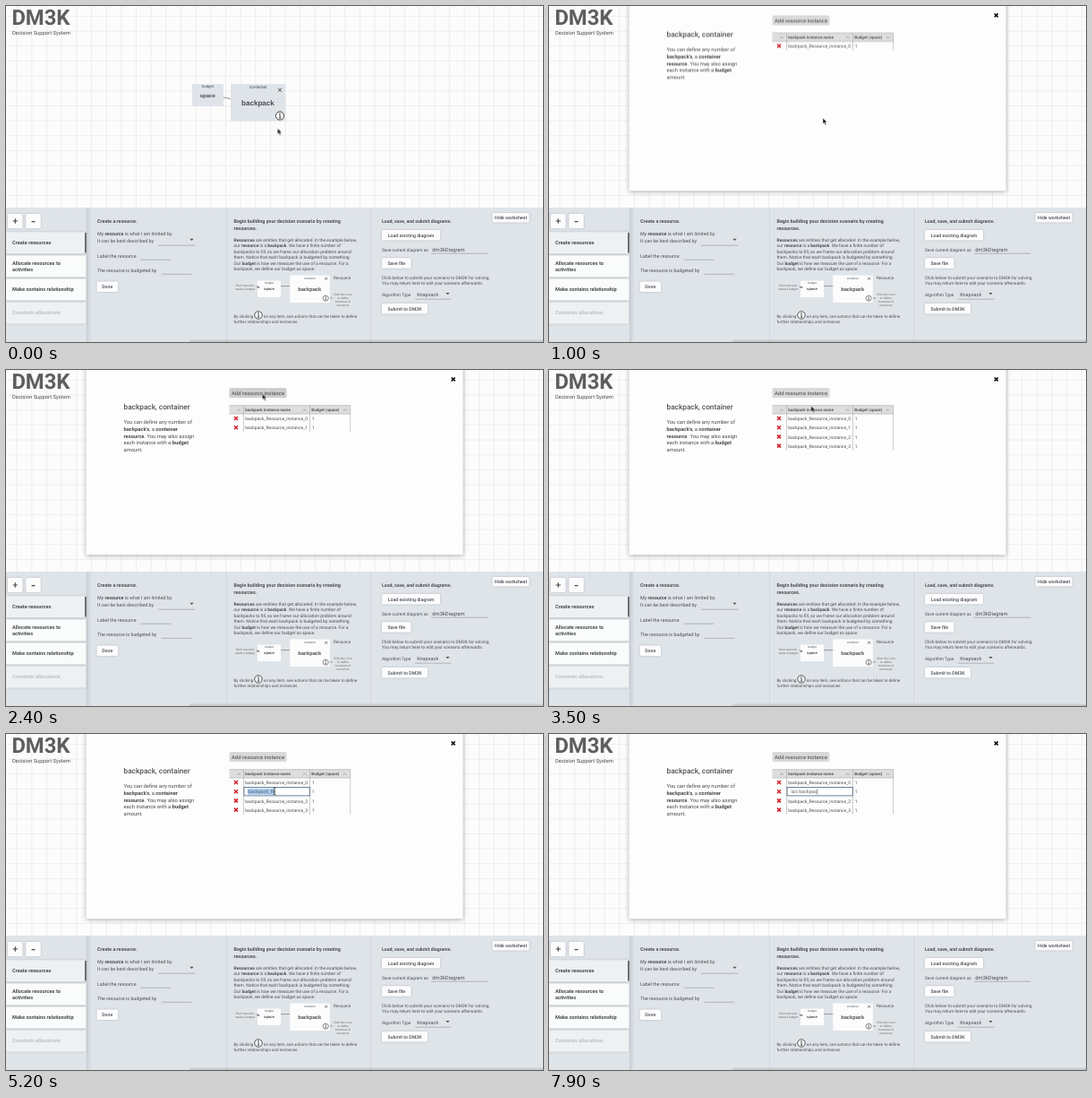
An HTML page that plays this animation: 600 px wide and 375 px high, repeating every 8 s.

```html
<!DOCTYPE html>
<html lang="en">
<head>
<meta charset="utf-8">
<title>Decision worksheet</title>
<style>
  html, body { margin: 0; width: 100%; height: 100%; overflow: hidden; background: #fcfcfc; }
  svg {
    display: block; width: 600px; height: 375px; fill: #484c50;
    font-family: Roboto, sans-serif; text-rendering: geometricPrecision;
  }
  .arial { font-family: "Liberation Sans", Arial, sans-serif; }
  .b { font-weight: 700; }
  .m { text-anchor: middle; }
  .white { fill: #fcfcfd; }
  .panel { fill: #dfe4e9; }
  .line { stroke: #8d9399; stroke-width: .6; fill: none; }
  .raised { fill: #fcfcfd; filter: drop-shadow(0 .5px .8px rgba(0, 0, 0, .2)); }

  .s32 { font-size: 3.2px; }
  .s46 { font-size: 4.6px; }
  .s48 { font-size: 4.82px; }
  .s49 { font-size: 4.92px; }
  .s50 { font-size: 4.95px; }
  .s52 { font-size: 5.2px; }
  .s53 { font-size: 5.3px; }
  .s54 { font-size: 5.42px; }
  .s56 { font-size: 5.65px; }
  .s58 { font-size: 5.8px; }

  /* Everything moves in hard 100 ms steps: 1.25% of the loop each. */
  .anim { animation: 8s step-end -20ms infinite; }
  #modal { animation-name: open; }
  #sheet { animation-name: settle; }
  #hover { animation-name: hover; }
  #row1 { animation-name: row1; }
  #row2 { animation-name: row2; }
  #row3 { animation-name: row3; }
  #editor { animation-name: edit; }
  #arrow { animation-name: move; }
  #beam { animation-name: beam; }

  @keyframes open {
    0% { opacity: 0; }
    10% { opacity: .3; }
    11.25% { opacity: .8; }
    12.5%, 100% { opacity: 1; }
  }
  @keyframes settle {
    0% { transform: translateY(-36px); }
    11.25% { transform: translateY(-20px); }
    12.5% { transform: translateY(-9.5px); }
    13.75% { transform: translateY(-3px); }
    15%, 100% { transform: none; }
  }
  @keyframes hover { 0% { opacity: 0; } 22.5% { opacity: .05; } 42.5%, 100% { opacity: 0; } }
  @keyframes row1 { 0% { opacity: 0; } 30%, 100% { opacity: 1; } }
  @keyframes row2 { 0% { opacity: 0; } 40%, 100% { opacity: 1; } }
  @keyframes row3 { 0% { opacity: 0; } 42.5%, 100% { opacity: 1; } }
  @keyframes edit { 0% { opacity: 0; } 55%, 100% { opacity: 1; } }
  @keyframes beam { 0% { opacity: 0; } 55% { opacity: 1; } 66.25%, 100% { opacity: 0; } }
  @keyframes move {
    0% { transform: translate(303.4px, 136.5px); }
    1.25% { transform: translate(304.5px, 130px); }
    2.5% { transform: translate(306px, 125px); }
    20% { transform: translate(303.5px, 106px); }
    21.25% { transform: translate(296px, 62px); }
    22.5% { transform: translate(289.4px, 30.5px); }
    23.75% { transform: translate(288px, 28px); }
    25% { transform: translate(287px, 27px); }
    26.25% { transform: translate(286.5px, 26.5px); }
    42.5% { transform: translate(290px, 33px); }
    43.75% { transform: translate(292.8px, 40px); }
    45% { transform: translate(295px, 46px); }
    46.25% { transform: translate(296.5px, 51px); }
    47.5% { transform: translate(298px, 56px); }
    48.75% { transform: translate(299px, 60px); }
    50% { transform: translate(299.5px, 62px); }
    51.25% { transform: translate(300px, 63.5px); }
    52.5% { transform: translate(300px, 64.5px); opacity: 1; }
    55%, 100% { transform: translate(300px, 64.5px); opacity: 0; }
  }
</style>
</head>
<body>
<svg viewBox="0 0 600 375">
  <defs>
    <pattern id="grid" x="11.6" y="10.9" width="16.667" height="16.667" patternUnits="userSpaceOnUse">
      <path d="M0 .4H16.667M.4 0V16.667" stroke="#e8e8e9" stroke-width=".8"/>
    </pattern>
    <linearGradient id="dock" x2="0" y2="1">
      <stop stop-color="#8c9196" stop-opacity="0"/>
      <stop offset="1" stop-color="#8c9196" stop-opacity=".4"/>
    </linearGradient>
    <linearGradient id="edge">
      <stop stop-color="#b9c0c7" stop-opacity=".6"/>
      <stop offset="1" stop-color="#b9c0c7" stop-opacity="0"/>
    </linearGradient>
    <clipPath id="field"><rect x="270" y="59.5" width="30.6" height="9.5"/></clipPath>
    <g id="info">
      <circle r="4.6" fill="#fcfcfd" stroke="#333" stroke-width=".9"/>
      <path d="M-.9-.8H.2V2.4M-1.2 2.4H1.3" fill="none" stroke="#333" stroke-width=".9"/>
      <circle cy="-2.4" r=".75" fill="#333"/>
    </g>
    <path id="cross" d="M-2-2L2 2M2-2L-2 2" fill="none"/>
    <path id="drop" d="M-2.2-1H2.2L0 1.3Z" fill="#555"/>
    <path id="sort" d="M-1.8 .9L0-.9L1.8 .9" fill="none" stroke="#777" stroke-width=".6"/>
  </defs>

  <!-- diagram canvas -->
  <rect width="600" height="226" fill="#fcfcfc"/>
  <rect width="600" height="226" fill="url(#grid)"/>
  <text class="b" x="6.4" y="21.2" font-size="23.8" fill="#5c5e60">DM3K</text>
  <text class="s58" x="7" y="31.6">Decision Support System</text>
  <path d="M243 102L251 103.5" stroke="#666" stroke-width=".7"/>
  <rect class="panel" x="208" y="87" width="35" height="25"/>
  <rect class="panel" x="251" y="87" width="61.5" height="41.5"/>
  <g class="arial m">
    <text x="225.5" y="91" font-size="4.2">budget</text>
    <text class="b" x="225.3" y="102.3" font-size="6">space</text>
    <text x="281.7" y="92" font-size="4.9">container</text>
    <text class="b" x="281.4" y="111.2" font-size="8.1">backpack</text>
  </g>
  <use href="#cross" x="306" y="93.7" stroke="#444" stroke-width="1"/>
  <use href="#info" x="306" y="122.5"/>

  <!-- resource dialog -->
  <g id="modal" class="anim">
    <rect x="89.5" y="-10" width="421" height="216.2" fill="#fdfdfd" style="filter:drop-shadow(.8px 1.7px 2.6px rgba(0,0,0,.32))"/>
    <use href="#cross" x="499.7" y="10.4" stroke="#111" stroke-width="1.5"/>
    <g id="sheet" class="anim">
      <text x="131.5" y="43.8" font-size="8.25" font-weight="500" fill="#505254">backpack, container</text>
      <g class="s58">
        <text x="131.5" y="60.1">You can define any number of</text>
        <text x="131.5" y="67.9"><tspan class="b">backpack's</tspan>, a <tspan class="b">container</tspan></text>
        <text x="131.5" y="75.6"><tspan class="b">resource</tspan>. You may also assign</text>
        <text x="131.5" y="83.4">each instance with a <tspan class="b">budget</tspan></text>
        <text x="131.5" y="91.1">amount.</text>
      </g>
      <rect x="249.5" y="20" width="64" height="11" rx="1.5" fill="#d9d9d9"/>
      <rect id="hover" class="anim" x="249.5" y="20" width="64" height="11" rx="1.5" fill="#000"/>
      <text class="m" x="281.5" y="27.5" font-size="5.9" font-weight="500" fill="#606060">Add resource instance</text>

      <rect x="249.5" y="39.5" width="135.5" height="9.5" fill="#dedede"/>
      <path d="M249.5 39.7H385M249.5 49H385M265.5 39.5V49M339.5 39.5V49M384.7 39.5V49" fill="none" stroke="#aaa" stroke-width=".6"/>
      <g class="b" font-size="4.55" fill="#555">
        <text x="267.2" y="46.2">backpack instance name</text>
        <text x="341.3" y="46.2">Budget (space)</text>
      </g>
      <use href="#sort" x="260" y="44.8"/>
      <use href="#sort" x="333.8" y="44.8"/>
      <use href="#sort" x="378.5" y="44.8"/>
      <g id="rows"></g>
    </g>
    <g id="editor" class="anim">
      <rect x="266" y="59.4" width="73.5" height="9.5" fill="#fff" stroke="#48627f" stroke-width=".8"/>
      <g clip-path="url(#field)">
        <rect id="mark" x="270" y="60.8" width="30" height="7" fill="#a8cbf0"/>
        <text id="typed" x="270.3" y="66" font-size="5.4" fill="#5d6166"></text>
        <rect id="caret" y="61.2" width=".6" height="6.3" fill="#222"/>
      </g>
    </g>
  </g>

  <!-- worksheet -->
  <rect class="panel" y="225" width="600" height="150"/>
  <path d="M246.5 225V375M407.5 225V375" stroke="#cfd5db" stroke-width=".9"/>
  <rect x="89.8" y="225" width="6" height="150" fill="url(#edge)"/>
  <rect x="205" y="371.5" width="395" height="3.5" fill="url(#dock)"/>

  <rect class="raised" x="2" y="232" width="16.5" height="16" rx="1.5"/>
  <rect class="raised" x="22.3" y="232" width="16.5" height="16" rx="1.5"/>
  <path d="M7.6 240H13M10.3 237.3V242.7M28.6 240.6H32.4" stroke="#444" stroke-width="1.1"/>
  <g id="tabs"></g>
  <rect x="88" y="253" width="1.7" height="22.5" fill="#5a5e62"/>
  <g class="b s56">
    <text x="7" y="266.2">Create resources</text>
    <text x="7" y="289.2">Allocate resources to</text>
    <text x="7" y="295.7">activities</text>
    <text x="7" y="318.1">Make contains relationship</text>
    <text x="7" y="344.2" fill="#bcc1c6">Constrain allocations</text>
  </g>

  <g class="s53">
    <text class="b s54" x="102" y="242.3">Create a resource.</text>
    <text x="102" y="255.6">My <tspan class="b">resource</tspan> is what I am limited by.</text>
    <text x="102" y="263.8">It can be best described by</text>
    <text x="102" y="281">Label the resource</text>
    <text x="102" y="297.2">The resource is budgeted by</text>
  </g>
  <path class="line" d="M170 267.2H211.5M150.5 283.2H184.5M173.5 299.3H207.5"/>
  <use href="#drop" x="207.5" y="260.8"/>

  <g class="b s54">
    <text x="254.5" y="242.3">Begin building your decision scenario by creating</text>
    <text x="254.5" y="249.5">resources.</text>
  </g>
  <g class="s49">
    <text x="254.5" y="262.6"><tspan class="b">Resources</tspan> are entities that get allocated. In the example below,</text>
    <text x="254.5" y="269.2">our <tspan class="b">resource</tspan> is a <tspan class="b">backpack</tspan>. We have a finite number of</text>
    <text x="254.5" y="275.8">backpacks to fill, so we frame our allocation problem around</text>
    <text x="254.5" y="282.3">them. Notice that each backpack is budgeted by something.</text>
    <text x="254.5" y="288.9">Our <tspan class="b">budget</tspan> is how we measure the use of a resource. For a</text>
    <text x="254.5" y="295.4">backpack, we define our budget as space.</text>
  </g>
  <path d="M279.5 313H284M307 312.6H317.5M361 326H365" stroke="#666" stroke-width=".6"/>
  <rect class="white" x="281" y="306.6" width="26" height="18.4"/>
  <rect class="white" x="317.3" y="300.5" width="44.5" height="30.5"/>
  <path d="M280.2 314.5H283.7L282 312.8Z"/>
  <g class="arial m">
    <text x="294" y="309.8" font-size="3.2">budget</text>
    <text class="b" x="294" y="317.2" font-size="4.2">space</text>
    <text x="339.3" y="304.6" font-size="3.2">container</text>
    <text class="b" x="339.2" y="317.8" font-size="5.7">backpack</text>
  </g>
  <use href="#cross" transform="translate(357.7 304.3) scale(.7)" stroke="#444"/>
  <use href="#info" transform="translate(357.2 326.2) scale(.66)"/>
  <text x="366" y="305.2" font-size="4.6">Resource</text>
  <g class="s32 m" fill="#666">
    <text x="267" y="312.8">Each resource</text>
    <text x="267" y="317">needs a budget</text>
    <text x="376.5" y="322.8">Click the i icon</text>
    <text x="376.5" y="326.8">to define</text>
    <text x="376.5" y="330.8">instances of</text>
    <text x="376.5" y="334.8">resources</text>
  </g>
  <g class="s46">
    <text x="254.5" y="347.6">By clicking</text>
    <text x="287.8" y="347.6">on any item, see actions that can be taken to define</text>
    <text x="254.5" y="353.8">further relationships and instances.</text>
  </g>
  <use href="#info" transform="translate(282 345) scale(.92)"/>

  <text class="b s52" x="420" y="242.3">Load, save, and submit diagrams.</text>
  <g class="s48">
    <text x="420" y="273.8">Save current diagram as</text>
    <text x="420" y="304.8">Click below to submit your scenario to DM3K for solving.</text>
    <text x="420" y="311.2">You may return here to edit your scenario afterwards.</text>
    <text x="420" y="324.2">Algorithm Type</text>
  </g>
  <text class="s58" x="476.3" y="274">dm3kDiagram</text>
  <text x="459.2" y="324.2" font-size="5.5">Knapsack</text>
  <path class="line" d="M475 276.2H538M457 327.2H497.5"/>
  <use href="#drop" x="493.5" y="321"/>
  <g id="buttons" class="s52 m" font-weight="500"></g>

  <!-- pointers -->
  <path id="arrow" class="anim" d="M0 0V6.6L1.5 5.2L2.6 7.7L3.8 7.2L2.7 4.8H4.7Z" fill="#111" stroke="#fff" stroke-width=".5"/>
  <path id="beam" class="anim" d="M298.8 60H301.4M300.1 60V67.6M298.8 67.6H301.4" fill="none" stroke="#222" stroke-width=".7"/>
</svg>
<script>
  const $ = id => document.getElementById(id);

  const button = (x, y, w, h, label) =>
    `<rect class="raised" x="${x}" y="${y}" width="${w}" height="${h}" rx="1.5"/>
     <text x="${x + w / 2}" y="${y + h / 2 + 1.9}">${label}</text>`;
  $('buttons').innerHTML = [
    button(101.5, 307.5, 23.5, 11.5, 'Done'),
    button(420, 250, 65, 11.5, 'Load existing diagram'),
    button(420, 281.2, 32.5, 11.5, 'Save file'),
    button(420, 332, 51, 11.5, 'Submit to DM3K'),
    button(543.5, 231, 41, 10.5, 'Hide worksheet')
  ].join('');

  const tabFills = ['#eef1f3', '#fafbfb', '#fafbfb', '#eef0f2'];
  $('tabs').innerHTML = tabFills.map((fill, i) =>
    `<rect class="raised" y="${252.3 + i * 26.1}" width="89.5" height="24" style="fill:${fill}"/>`).join('');

  const row = i => {
    const y = 54 + i * 10.2;
    return `<g id="row${i}" class="${i ? 'anim' : ''}">
      <path d="M265.5 ${y - 5}v10.2M339.5 ${y - 5}v10.2M384.7 ${y - 5}v10.2" fill="none" stroke="#aaa" stroke-width=".6"/>
      <use href="#cross" x="257" y="${y}" stroke="#d3222a" stroke-width="1.5"/>
      <text class="s50" x="267.2" y="${y + 2.1}">backpack_Resource_instance_${i}</text>
      <text class="s50" x="341.7" y="${y + 2.1}">1</text>
    </g>`;
  };
  $('rows').innerHTML = [0, 1, 2, 3].map(row).join('');

  // Times at which the field holds the first n letters.
  const phrase = "Nadia's backpack";
  const keys = [[5300, 0], [5400, 1], [5600, 2], [5700, 3], [5800, 4], [5900, 5], [6100, 6], [6200, 7],
    [6400, 8], [6600, 9], [6700, 10], [6800, 12], [7000, 13], [7200, 14], [7900, 15]];
  const left = 270.3, right = 299.6;
  const typed = $('typed'), caret = $('caret'), mark = $('mark');
  typed.style.whiteSpace = 'pre';
  const start = performance.now() - 20;
  let shown = null;

  function draw() {
    const t = (performance.now() - start) % 8000;
    const key = keys.filter(k => k[0] <= t).pop();
    const text = key ? phrase.slice(0, key[1]) : 'backpack_Resource_instance_1';
    if (text !== shown) {
      shown = typed.textContent = text;
      const width = text ? typed.getComputedTextLength() : 0;
      const x = key ? Math.min(left, right - width) : left;
      typed.setAttribute('x', x);
      caret.setAttribute('x', x + width);
    }
    caret.style.opacity = key ? 1 : 0;
    mark.style.opacity = t >= 5200 && !key ? 1 : 0;
    requestAnimationFrame(draw);
  }
  draw();
</script>
</body>
</html>
```
